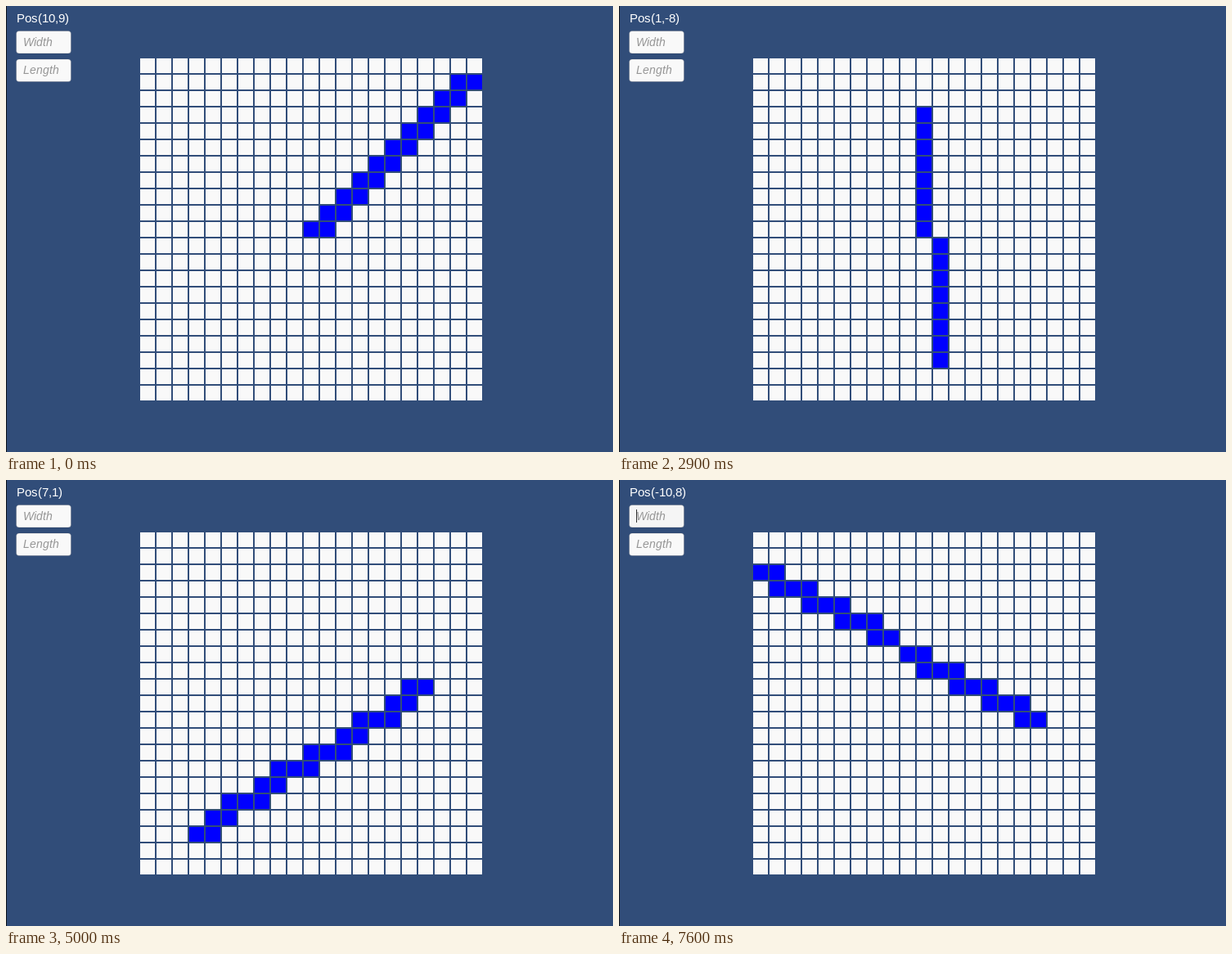
Animation, 742 px wide and 545 px high, one loop 8 s. Source, as an HTML page with a canvas:

```html
<!DOCTYPE html>
<html lang="en">
<head>
<meta charset="utf-8">
<title>Grid line drawing</title>
<style>
  html, body { margin: 0; width: 100%; height: 100%; overflow: hidden; background: #314d79; }
  canvas { display: block; }
</style>
</head>
<body>
<canvas id="stage" width="742" height="545"></canvas>
<script>
const ctx = document.getElementById('stage').getContext('2d');
const LOOP = 8000, STEP = 100, HALF = 10, PITCH = 20, CELL = 18;
const FONT = '"Liberation Sans", Arial, sans-serif';

// Pointer key points (ms, x, y); each drag draws from its first point.
const drags = [
  [[-1000, 0, 0], [0, 10, 9]],
  [[1500, 0, 7], [1600, -1, 7], [1700, -1, 7], [2100, -7, 2], [2600, 1, -6],
   [2800, 2, -9], [2900, 1, -8], [3200, -6, -9], [3300, -6, -9], [3500, -7, -8]],
  [[3600, -7, -8], [4200, -2, 2], [4800, 7, 4], [5000, 7, 1], [5200, 7, -4],
   [5300, 7, -4], [5600, 9, -9], [5900, 7, -1]],
  [[6100, 7, -1], [6500, -8, 7], [6700, -8, 7], [6900, -10, 8]]
];

function pointerAt(time, drag) {
  const next = drag.findIndex(key => key[0] > time);
  if (next < 0) return drag.at(-1).slice(1);
  const [t0, x0, y0] = drag[next - 1], [t1, x1, y1] = drag[next];
  const progress = (time - t0) / (t1 - t0);
  return [Math.round(x0 + (x1 - x0) * progress), Math.round(y0 + (y1 - y0) * progress)];
}

// Every cell the segment passes through; exact corner hits step diagonally.
function lineCells([x, y], [endX, endY]) {
  const nx = Math.abs(endX - x), ny = Math.abs(endY - y);
  const sx = Math.sign(endX - x), sy = Math.sign(endY - y);
  const cells = [[x, y]];
  for (let ix = 0, iy = 0; ix < nx || iy < ny;) {
    const decision = (1 + 2 * ix) * ny - (1 + 2 * iy) * nx;
    if (decision <= 0) { x += sx; ix++; }
    if (decision >= 0) { y += sy; iy++; }
    cells.push([x, y]);
  }
  return cells;
}

function fillCell(x, y, color) {
  ctx.fillStyle = color;
  ctx.fillRect(164 + (x + HALF) * PITCH, 64 + (HALF - y) * PITCH, CELL, CELL);
}

// Hinted text: every glyph advances by whole pixels.
function drawText(text, x, y, font, color) {
  ctx.font = `${font} ${FONT}`;
  ctx.fillStyle = color;
  for (const glyph of text) {
    ctx.fillText(glyph, x, y);
    x += Math.round(ctx.measureText(glyph).width);
  }
}

function drawInput(label, y, color) {
  ctx.beginPath();
  ctx.roundRect(12.5, y, 67, 27.5, 3.5);
  ctx.fillStyle = color;
  ctx.fill();
  ctx.strokeStyle = 'rgba(40, 50, 70, 0.25)';
  ctx.lineWidth = 1;
  ctx.stroke();
  drawText(label, 21, Math.round(y + 18.2), 'italic 14px', '#969696');
}

function draw(time) {
  ctx.fillStyle = '#314d79';
  ctx.fillRect(0, 0, 742, 545);
  ctx.fillStyle = '#10151d';
  ctx.fillRect(0, 0, 1, 545);

  for (let y = -HALF; y <= HALF; y++)
    for (let x = -HALF; x <= HALF; x++) fillCell(x, y, '#f9f9f9');

  const drag = drags.findLast(keys => keys[0][0] <= time);
  const origin = drag[0].slice(1);
  const target = pointerAt(Math.floor(time / STEP) * STEP, drag);
  const cells = lineCells(origin, target);
  if (cells.length > 1) cells.forEach(([x, y]) => fillCell(x, y, '#0000ff'));

  drawText(`Pos(${target})`, 13, 20, '15px', '#fff');
  drawInput('Width', 30.5, time < 7200 ? '#f9f9f9' : '#f5f5f5');
  drawInput('Length', 65, '#f9f9f9');
  if (time >= 7500) {
    ctx.fillStyle = '#323232';
    ctx.fillRect(21, 36, 1, 16);
  }
}

const began = performance.now();
function tick() {
  draw((performance.now() - began) % LOOP);
  requestAnimationFrame(tick);
}
tick();
</script>
</body>
</html>
```
